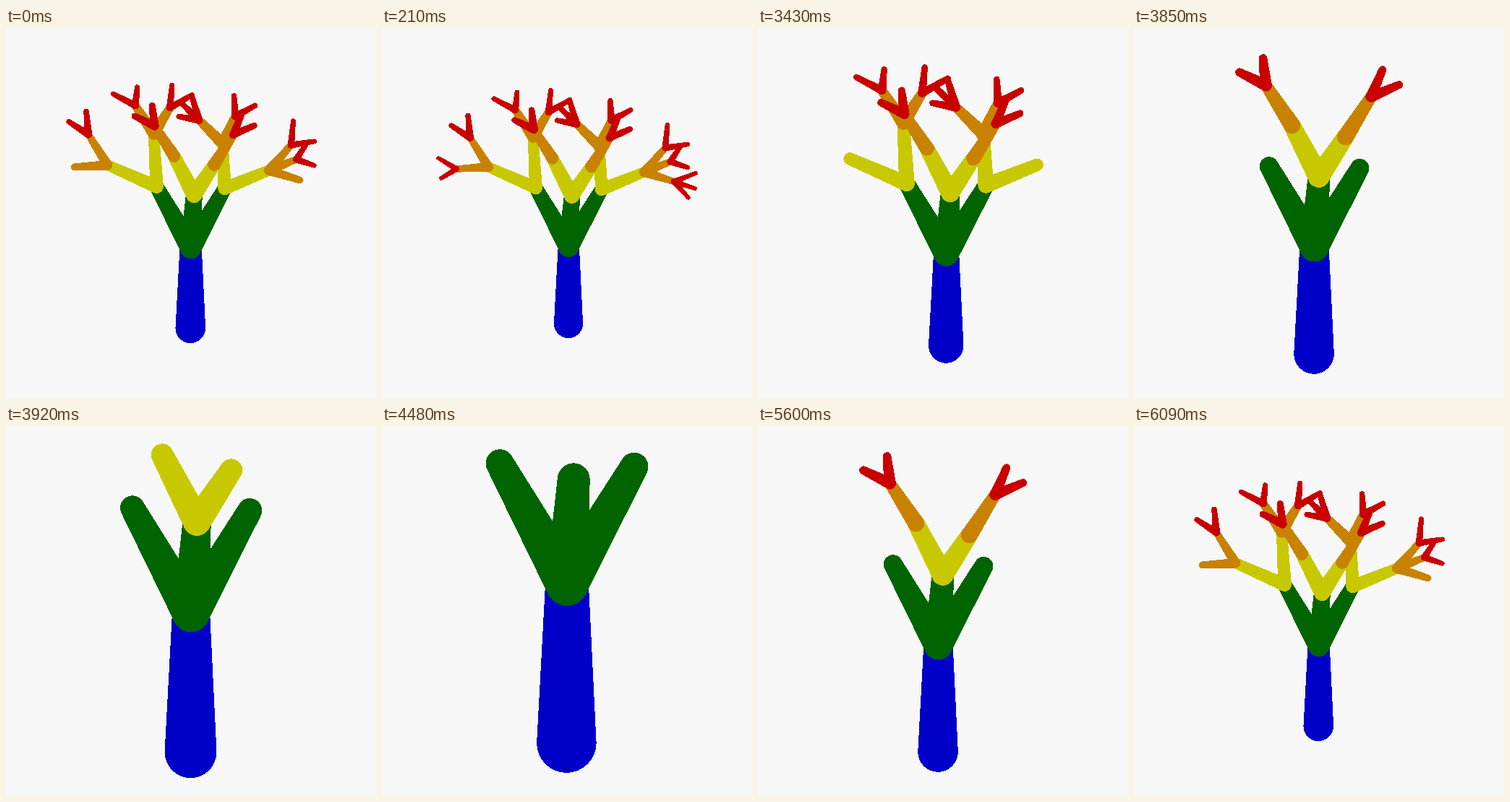
These frames come from a looping animation (512x512 px, 6370 ms). An HTML page:

```html
<!DOCTYPE html>
<html lang="en">
<head>
<meta charset="utf-8">
<title>Pruned tree</title>
<style>
  html, body { margin: 0; width: 100%; height: 100%; overflow: hidden; background: #f7f7f7; }
  svg { display: block; width: 100%; height: 100%; shape-rendering: crispEdges; }
</style>
</head>
<body>
<svg id="stage" viewBox="0 0 512 512"></svg>
<script>
// Each level has a colour and a base and tip radius.
const LEVELS = [
  { color: '#0000c8', base: 20.1, tip: 14.6 },
  { color: '#006400', base: 14.4, tip: 9.5 },
  { color: '#c8c800', base: 9, tip: 7.2 },
  { color: '#c88200', base: 6.6, tip: 4.6 },
  { color: '#c80000', base: 4.6, tip: 3.3 }
];

// A fork is visible up to pruning stage `life`; a tip is [x, y, fork, thickness].
const KEPT = 9;
const fork = (size, life, ...tips) => ({ size, life, tips });

const leftSide = fork(1, 4,
  [147.5, 192.5, fork(1, 2,
    [122, 152, fork(1.1, KEPT, [119, 121], [96, 135])],
    [103, 195, fork(.88, 1, [78, 180], [82, 208])])],
  [209, 151, fork(1.2, KEPT,
    [184.5, 113.5, fork(1.05, KEPT, [187, 89], [155, 98])],
    [230.5, 116.5, fork(1.05, KEPT, [233.5, 86.5], [260, 99.5])])]);

const middle = fork(1.2, 6,
  [236, 180.5, fork(1.28, 5,
    [210, 140.5, fork(1.3, KEPT, [207, 113.5], [183.5, 127.5])])],
  [289.5, 192, fork(1.28, 5,
    [315, 152, fork(1.2, KEPT, [343, 140], [326.5, 125])])]);

const rightSide = fork(1, 4,
  [301, 164, fork(1.2, KEPT,
    [269.5, 133, fork(1.1, 3, [259.5, 100], [245.4, 109.7], [242.5, 128])],
    [317.5, 128, fork(1.1, KEPT, [316, 100.5], [344, 113.5])])],
  [362.5, 199.5, fork(1, 2,
    [392, 166, fork(1, KEPT, [395, 134], [423, 161])],
    [399, 185, fork(1, KEPT, [414, 162], [423, 193])],
    [404, 212.5, fork(.88, 0, [434, 201], [433, 222], [424, 235])])]);

const crown = fork(1, KEPT,
  [213, 221.3, leftSide],
  [262.8, 232, middle, 1.15],
  [303.7, 223.3, rightSide]);
const root = { x: 258, y: 409, fork: fork(1, KEPT, [258.3, 302.5, crown]) };

// Camera fit per pruning stage: scale x, scale y, shift x, shift y.
const VIEWS = [
  [1, 1, 0, 0],
  [1.016, 1.016, 1.7, -3.6],
  [1.038, 1.042, -12.5, -10.9],
  [1.206, 1.195, -50.9, -49.1],
  [1.206, 1.195, -50.9, -49.1],
  [1.384, 1.384, -108, -115.1],
  [1.79, 1.8, -206.3, -285],
  [2.053, 2.062, -274.3, -404.6]
];

const LOOP = 6370;
const SCHEDULE = [
  [0, 2], [70, 1], [210, 0], [3010, 1], [3150, 2], [3430, 3], [3710, 4], [3850, 5],
  [3920, 6], [4480, 7], [5040, 6], [5600, 5], [5670, 4], [5810, 3], [6090, 2]
];

const stageSvg = document.getElementById('stage');
const paths = LEVELS.map(({ color }) => {
  const path = document.createElementNS('http://www.w3.org/2000/svg', 'path');
  path.setAttribute('fill', color);
  return stageSvg.appendChild(path);
});

// Outline of a tapered limb with round ends.
function limb(x0, y0, r0, x1, y1, r1) {
  const length = Math.hypot(x1 - x0, y1 - y0);
  const nx = (y0 - y1) / length, ny = (x1 - x0) / length;
  const at = (x, y, r) => `${(x + nx * r).toFixed(2)} ${(y + ny * r).toFixed(2)}`;
  return `M${at(x0, y0, r0)}L${at(x1, y1, r1)}A${r1} ${r1} 0 0 0 ${at(x1, y1, -r1)}` +
    `L${at(x0, y0, -r0)}A${r0} ${r0} 0 0 0 ${at(x0, y0, r0)}Z`;
}

function drawTree(stage) {
  const [sx, sy, tx, ty] = VIEWS[stage];
  const outlines = LEVELS.map(() => '');

  function grow(x, y, node, level) {
    if (!node || stage > node.life) return;
    const { base, tip } = LEVELS[level];
    const scale = sx * node.size;
    for (const [endX, endY, next, thickness = 1] of node.tips) {
      outlines[level] += limb(
        x * sx + tx, y * sy + ty, base * scale,
        endX * sx + tx, endY * sy + ty, tip * scale * thickness);
      grow(endX, endY, next, level + 1);
    }
  }

  grow(root.x, root.y, root.fork, 0);
  paths.forEach((path, i) => path.setAttribute('d', outlines[i]));
}

const start = performance.now();
let shown = -1;
function tick() {
  const time = (performance.now() - start) % LOOP;
  const stage = SCHEDULE.findLast(([from]) => from <= time)[1];
  if (stage !== shown) drawTree(shown = stage);
  requestAnimationFrame(tick);
}
tick();
</script>
</body>
</html>
```
